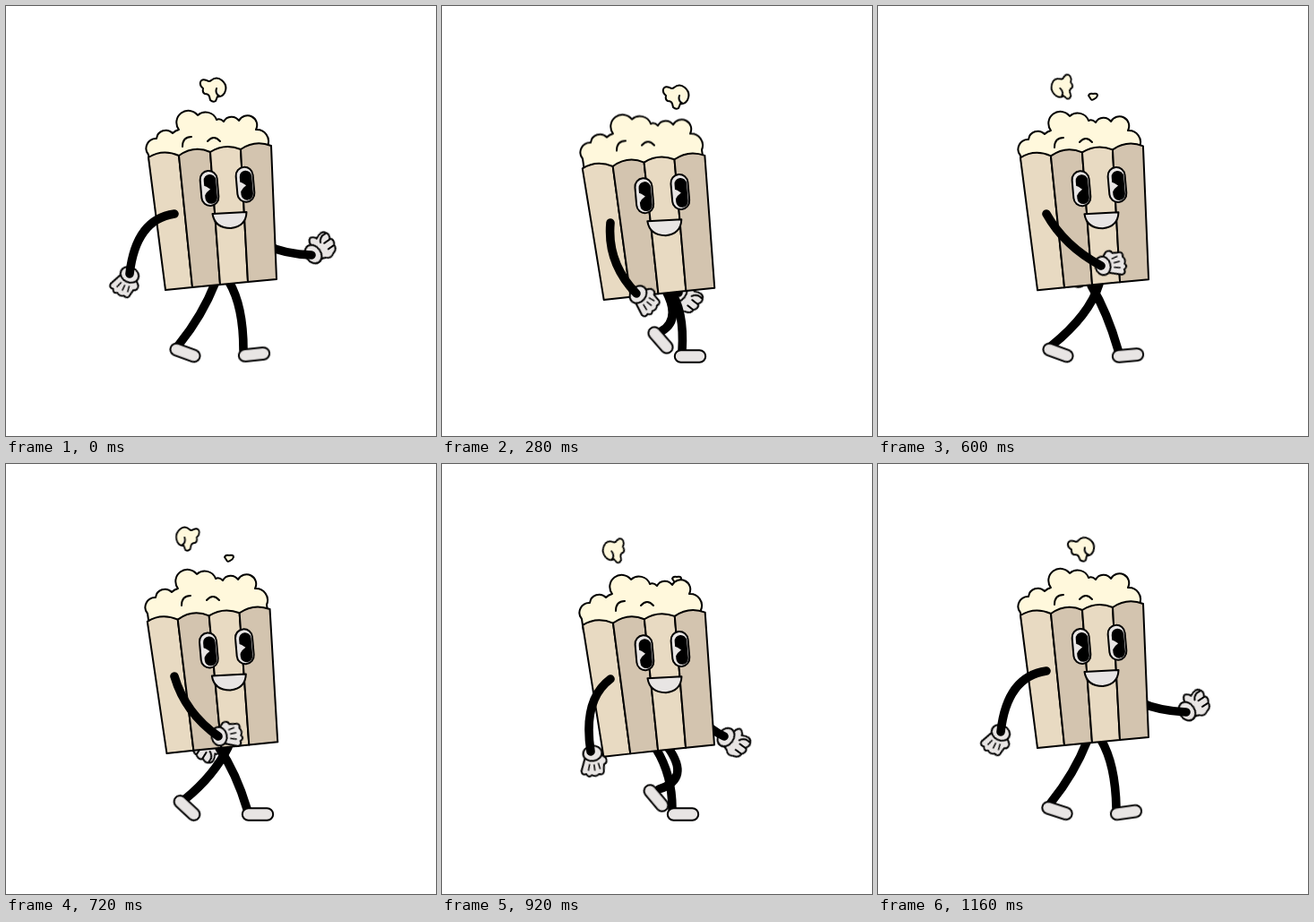
An HTML page without scripts for the animation above (1200 ms loop, 480 px wide and 480 px high).

```html
<!DOCTYPE html>
<html lang="en">
<head>
<meta charset="utf-8">
<title>Walking popcorn</title>
<style>
@property --u { syntax: "<number>"; inherits: true; initial-value: 0; }
html, body { margin: 0; height: 100%; overflow: hidden; background: #fff; }
svg { display: block; width: 100vw; height: 100vh; stroke: #000; stroke-width: 2; stroke-linejoin: round; stroke-linecap: round; }

/* poses advance in 40 ms ticks: three per segment unless a key says otherwise */
svg, .move { animation: 1200ms steps(3) -5ms infinite; }
.limb { fill: none; stroke-width: 9.6; }
.none { fill: none; }
.white { fill: #e8e5e4; }
.corn { fill: #fff8dc; }
.light { fill: #e8dac2; }
.dark { fill: #d3c4af; }

/* --u: 0 = body high, 1 = body low */
svg { animation-name: bob; }
.bag { transform: matrix(1, calc(-.011 * var(--u)), calc(.033 * var(--u)), calc(1 - .008 * var(--u)), calc(-7.8 * var(--u)), calc(15.45 * var(--u))); }
.face { transform: translate(calc(-1.2px * var(--u)), calc(8.2px * var(--u))); }

.heap { animation-name: heap; }
.pop1 { animation-name: pop1; }
.pop2 { animation-name: pop2; }
.pop3 { animation-name: pop3; }
.armN { animation-name: armN; }
.handN { animation-name: handN; }
.armF { animation-name: armF; }
.handF { animation-name: handF; }
.legA { animation-name: legA; }
.footA { animation-name: footA; }
.legB { animation-name: legB; }
.footB { animation-name: footB; }

@keyframes bob {
  0%, 100% { --u: 0; animation-timing-function: steps(2); }
  6.667% { --u: .22; animation-timing-function: steps(2); }
  13.333% { --u: .57; }
  23.333% { --u: 1; animation-timing-function: steps(2); }
  30% { --u: .86; }
  40% { --u: .32; }
  50% { --u: .03; }
  60% { --u: .55; animation-timing-function: steps(2); }
  66.667% { --u: .92; }
  76.667% { --u: .88; }
  86.667% { --u: .4; }
  96.667% { --u: 0; animation-timing-function: steps(1); }
}
@keyframes heap {
  0%, 100% { transform: translate(0, 0); animation-timing-function: steps(2); }
  6.667% { transform: translate(0, 0); animation-timing-function: steps(2); }
  13.333% { transform: translate(-1px, 1px); }
  23.333% { transform: translate(-2px, 4.5px); animation-timing-function: steps(2); }
  30% { transform: translate(-3px, 6.5px); }
  40% { transform: translate(-2px, 5px); }
  50% { transform: translate(0, 1px); }
  60% { transform: translate(-1px, 1px); animation-timing-function: steps(2); }
  66.667% { transform: translate(-2px, 4px); }
  76.667% { transform: translate(-3px, 7px); }
  86.667% { transform: translate(-2px, 4px); }
  96.667% { transform: translate(0, 0); animation-timing-function: steps(1); }
}
@keyframes pop1 {
  0%, 100% { transform: translate(231px, 93px) rotate(0deg); animation-timing-function: steps(2); }
  6.667% { transform: translate(238px, 92px) rotate(2deg); animation-timing-function: steps(2); }
  13.333% { transform: translate(245px, 92px) rotate(3deg); }
  23.333% { transform: translate(261px, 101px) rotate(0deg); animation-timing-function: steps(2); }
  30% { transform: translate(268px, 115px) rotate(10deg); }
  40% { transform: translate(269px, 148px) rotate(20deg); }
  76.667% { transform: translate(212px, 146px) rotate(-30deg); }
  86.667% { transform: translate(221px, 116px) rotate(-20deg); }
  96.667% { transform: translate(227px, 95px) rotate(-8deg); animation-timing-function: steps(1); }
}
@keyframes pop2 {
  0%, 100% { transform: translate(188px, 160px) rotate(-30deg); animation-timing-function: steps(3); }
  30% { transform: translate(213px, 148px) rotate(-85deg); }
  40% { transform: translate(211px, 115px) rotate(-75deg); }
  50% { transform: translate(207px, 91px) rotate(-30deg); }
  60% { transform: translate(203px, 83px) rotate(0deg); animation-timing-function: steps(2); }
  66.667% { transform: translate(199px, 86px) rotate(-8deg); }
  76.667% { transform: translate(193px, 97px) rotate(-22deg); }
  86.667% { transform: translate(189px, 124px) rotate(-30deg); }
  96.667% { transform: translate(188px, 160px) rotate(-30deg); animation-timing-function: steps(1); }
}
@keyframes pop3 {
  0%, 30%, 100% { transform: translate(222px, 138px); }
  40% { transform: translate(230px, 112px); }
  50% { transform: translate(240px, 101px); }
  60% { transform: translate(249px, 105px); animation-timing-function: steps(2); }
  66.667% { transform: translate(254px, 111px); }
  76.667% { transform: translate(262px, 129px); }
  86.667% { transform: translate(264px, 146px); }
}
@keyframes armN {
  0%, 100% { d: path("M188 232Q145 238 138 299"); animation-timing-function: steps(2); }
  6.667% { d: path("M188 234Q152 246 151 311"); animation-timing-function: steps(2); }
  13.333% { d: path("M188 237Q161 260 167 318"); }
  23.333% { d: path("M188 242Q184 287 217 321"); animation-timing-function: steps(2); }
  30% { d: path("M188 241Q195 282 236 309"); }
  40% { d: path("M188 235Q206 270 247 293"); }
  50% { d: path("M188 232Q208 268 249 290"); }
  60% { d: path("M188 237Q200 278 237 304"); animation-timing-function: steps(2); }
  66.667% { d: path("M188 240Q184 285 213 320"); }
  76.667% { d: path("M188 240Q157 263 166 321"); }
  86.667% { d: path("M188 235Q148 242 144 305"); }
  96.667% { d: path("M188 231Q144 237 137 299"); animation-timing-function: steps(1); }
}
@keyframes handN {
  0%, 100% { transform: translate(138px, 300px) rotate(25deg); animation-timing-function: steps(2); }
  6.667% { transform: translate(151px, 312px) rotate(15deg); animation-timing-function: steps(2); }
  13.333% { transform: translate(167px, 320px) rotate(2deg); }
  23.333% { transform: translate(219px, 322px) rotate(-50deg); animation-timing-function: steps(2); }
  30% { transform: translate(237px, 310px) rotate(-80deg); }
  40% { transform: translate(249px, 293px) rotate(-97deg); }
  50% { transform: translate(251px, 290px) rotate(-105deg); }
  60% { transform: translate(238px, 304px) rotate(-102deg); animation-timing-function: steps(2); }
  66.667% { transform: translate(214px, 321px) rotate(-65deg); }
  76.667% { transform: translate(168px, 323px) rotate(-8deg); }
  86.667% { transform: translate(144px, 306px) rotate(12deg); }
  96.667% { transform: translate(137px, 300px) rotate(26deg); animation-timing-function: steps(1); }
}
@keyframes armF {
  0%, 100% { d: path("M262 240Q282 276 341 278"); animation-timing-function: steps(2); }
  6.667% { d: path("M262 242Q280 282 332 290"); animation-timing-function: steps(2); }
  13.333% { d: path("M262 244Q280 286 318 302"); }
  23.333% { d: path("M262 248Q262 290 264 320"); animation-timing-function: steps(2); }
  30% { d: path("M262 246Q252 285 242 304"); }
  40% { d: path("M262 240Q245 270 226 288"); }
  50% { d: path("M262 240Q245 270 225 286"); }
  60% { d: path("M262 244Q245 275 231 306"); animation-timing-function: steps(2); }
  66.667% { d: path("M262 246Q256 285 262 312"); }
  76.667% { d: path("M262 246Q282 288 315 304"); }
  86.667% { d: path("M262 242Q280 282 333 289"); }
  96.667% { d: path("M262 240Q283 274 344 277"); animation-timing-function: steps(1); }
}
@keyframes handF {
  0%, 100% { transform: translate(343px, 277px) rotate(-35deg); animation-timing-function: steps(2); }
  6.667% { transform: translate(333px, 290px) rotate(-22deg); animation-timing-function: steps(2); }
  13.333% { transform: translate(319px, 302px) rotate(-4deg); }
  23.333% { transform: translate(264px, 320px) rotate(38deg); animation-timing-function: steps(2); }
  30% { transform: translate(242px, 305px) rotate(75deg); }
  40% { transform: translate(226px, 288px) rotate(105deg); }
  50% { transform: translate(225px, 286px) rotate(115deg); }
  60% { transform: translate(230px, 306px) rotate(122deg); animation-timing-function: steps(2); }
  66.667% { transform: translate(262px, 313px) rotate(75deg); }
  76.667% { transform: translate(317px, 305px) rotate(36deg); }
  86.667% { transform: translate(334px, 289px) rotate(-5deg); }
  96.667% { transform: translate(345px, 276px) rotate(-33deg); animation-timing-function: steps(1); }
}
@keyframes legA {
  0%, 100% { d: path("M234 308Q219 346 193 378"); animation-timing-function: steps(2); }
  6.667% { d: path("M236 311Q230 348 203 374"); animation-timing-function: steps(2); }
  13.333% { d: path("M238 315Q252 350 222 368"); }
  23.333% { d: path("M250 318Q267 350 245 363"); animation-timing-function: steps(2); }
  30% { d: path("M246 317Q267 349 252 367"); }
  40% { d: path("M238 314Q256 343 264 378"); }
  50% { d: path("M238 312Q256 342 268 384"); }
  60% { d: path("M238 317Q257 345 269 385"); animation-timing-function: steps(2); }
  66.667% { d: path("M239 318Q259 345 267 385"); }
  76.667% { d: path("M239 318Q257 347 257 385"); }
  86.667% { d: path("M242 313Q248 350 230 385"); }
  96.667% { d: path("M234 308Q219 346 193 378"); animation-timing-function: steps(1); }
}
@keyframes footA {
  0%, 100% { transform: translate(200px, 387px) rotate(20deg); animation-timing-function: steps(2); }
  6.667% { transform: translate(206px, 385px) rotate(47deg); animation-timing-function: steps(2); }
  13.333% { transform: translate(220px, 381px) rotate(73deg); }
  23.333% { transform: translate(244px, 373px) rotate(49deg); animation-timing-function: steps(2); }
  30% { transform: translate(258px, 376px) rotate(24deg); }
  40% { transform: translate(274.5px, 383px) rotate(-11deg); }
  50% { transform: translate(279px, 390px) rotate(-5deg); }
  60% { transform: translate(281px, 391px) rotate(0deg); animation-timing-function: steps(2); }
  66.667% { transform: translate(278px, 391px) rotate(0deg); }
  76.667% { transform: translate(269px, 391px) rotate(0deg); }
  86.667% { transform: translate(239px, 391px) rotate(0deg); }
  96.667% { transform: translate(200px, 387px) rotate(18deg); animation-timing-function: steps(1); }
}
@keyframes legB {
  0%, 100% { d: path("M249 308Q265 335 265 384"); animation-timing-function: steps(2); }
  6.667% { d: path("M250 311Q266 335 266 384"); animation-timing-function: steps(2); }
  13.333% { d: path("M251 314Q267 335 266 385"); }
  23.333% { d: path("M254 316Q271 340 268 385"); animation-timing-function: steps(2); }
  30% { d: path("M252 316Q264 345 256 385"); }
  40% { d: path("M248 314Q249 350 231 385"); }
  50% { d: path("M247 310Q236 345 194 379"); }
  60% { d: path("M248 316Q232 348 200 374"); animation-timing-function: steps(2); }
  66.667% { d: path("M250 318Q255 352 216 368"); }
  76.667% { d: path("M252 316Q278 352 242 363"); }
  86.667% { d: path("M250 314Q266 345 258 374"); }
  96.667% { d: path("M249 308Q265 335 266 384"); animation-timing-function: steps(1); }
}
@keyframes footB {
  0%, 100% { transform: translate(277px, 389px) rotate(-6deg); animation-timing-function: steps(2); }
  6.667% { transform: translate(278px, 390px) rotate(-2deg); animation-timing-function: steps(2); }
  13.333% { transform: translate(277px, 391px) rotate(0deg); }
  23.333% { transform: translate(277px, 391px) rotate(0deg); animation-timing-function: steps(2); }
  30% { transform: translate(264px, 391px) rotate(0deg); }
  40% { transform: translate(236.5px, 391px) rotate(0deg); }
  50% { transform: translate(201px, 387px) rotate(20deg); }
  60% { transform: translate(202px, 384px) rotate(43deg); animation-timing-function: steps(2); }
  66.667% { transform: translate(214px, 380px) rotate(66deg); }
  76.667% { transform: translate(239px, 373px) rotate(50deg); }
  86.667% { transform: translate(268px, 380px) rotate(0deg); }
  96.667% { transform: translate(277px, 389px) rotate(-8deg); animation-timing-function: steps(1); }
}
</style>
</head>
<body>
<svg viewBox="0 0 480 480">
  <defs>
    <path id="kernel" d="M-14-8Q-13-12-7-10Q-4-8-2-10Q4-15 10-10Q17-4 13 4Q10 9 5 8Q4 11 3 13Q0 15-3 12L-4 8Q-5 5-9 5Q-12 4-11-1Q-15-4-14-8ZM4-1Q2 5 8 8"/>
    <rect id="foot" x="-17.200" y="-6.800" width="34.400" height="13.600" rx="6.800"/>
    <g id="eye">
      <rect class="white" x="-9.500" y="-19.500" width="19" height="39" rx="9.500"/>
      <rect x="-5.500" y="-15.500" width="13.500" height="33" rx="6.700" stroke="none"/>
      <path class="white" stroke="none" d="M-7-4Q-3-3 1 1Q-3 3-6 8Z"/>
    </g>
  </defs>

  <g class="move handF">
    <path class="white" d="M3-9Q5-19 10-16Q13-14 13-12Q22-17 25-12Q28-8 25-4Q29 0 25 5Q25 11 19 12Q13 16 9 11L3 9Z"/>
    <path class="none" d="M24-11Q17-12 14-6M25-3H17M24 5H17"/>
    <ellipse class="white" rx="8.500" ry="11"/>
  </g>
  <path class="move limb armF" d="M262 240Q282 276 341 278"/>

  <path class="move limb legA" d="M234 308Q219 346 193 378"/>
  <path class="move limb legB" d="M249 308Q265 335 265 384"/>
  <use class="move white footA" href="#foot"/>
  <use class="move white footB" href="#foot"/>

  <g class="corn">
    <use class="move pop1" href="#kernel"/>
    <g class="move pop2"><use href="#kernel" transform="scale(-.9 1)"/></g>
    <path class="move pop3" d="M-5-1Q-4-4 0-3Q5-4 5-1Q4 2 1 3Q-2 5-3 2Z"/>
    <g class="move heap">
      <path d="M161 180L159 166A11 11 0 0 1 168 148A10.500 10.500 0 0 1 186 142Q189 139 193 138A13 13 0 0 1 214 122A13 13 0 0 1 235 127Q239 125 243 129A10 10 0 0 1 260 128A10.500 10.500 0 0 1 279 138A13 13 0 0 1 292 156L294 170Z"/>
      <path class="none" d="M197 157Q197 146 207 146M225 151Q232 143 239 151"/>
    </g>
  </g>

  <g class="bag">
    <path class="light" d="M159 169Q175 159 193 167L208 314L178 317Z"/>
    <path class="dark" d="M193 167Q210 155 228 163L239 311L208 314Z"/>
    <path class="light" d="M228 163Q244 153 262 160L270 308L239 311Z"/>
    <path class="dark" d="M262 160Q278 149 296 156L302 305L270 308Z"/>
  </g>
  <g class="face">
    <use href="#eye" transform="translate(227 203.500) rotate(-5)"/>
    <use href="#eye" transform="translate(267 199.300) rotate(-5)"/>
    <path class="white" d="M230.500 232L268.500 230Q268 246 251 248Q233 248 230.500 232Z"/>
  </g>

  <g class="move handN">
    <path class="white" d="M-9 4L-15 18Q-15 23-10 22Q-8 27-4 24Q0 27 4 24Q10 26 10 20L11 14Q16 12 14 7L9 2Z"/>
    <path class="none" stroke-width="1.500" d="M-5 12L-7 18M0 13V19M5 12L6 18"/>
    <ellipse class="white" rx="10.500" ry="8.500"/>
  </g>
  <path class="move limb armN" d="M188 232Q145 238 138 299"/>
</svg>
</body>
</html>
```
